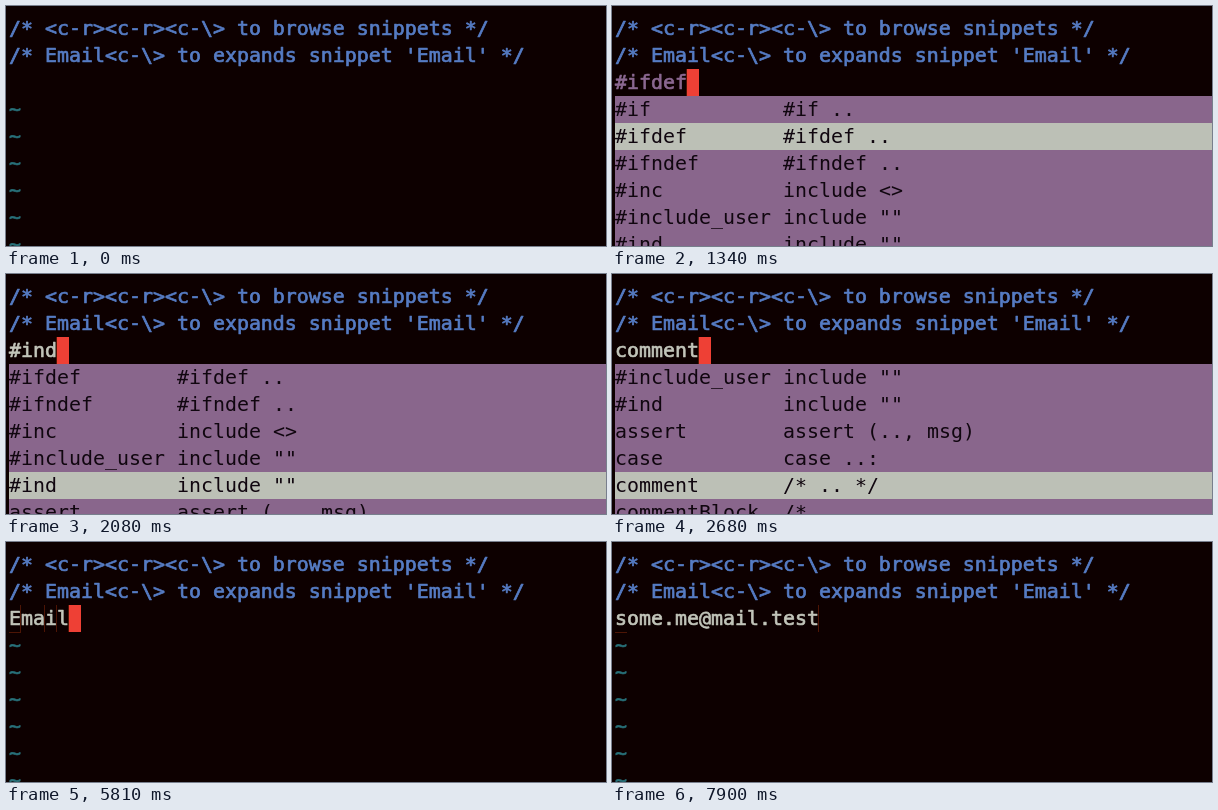
Recreate the animation shown at these times as an HTML page with a canvas. Size 600 by 240 pixels, loop 8000 ms.

```html
<!DOCTYPE html>
<html lang="en">
<head>
<meta charset="utf-8">
<title>Snippet completion</title>
<style>
  html, body { margin: 0; width: 600px; height: 240px; overflow: hidden; background: #0d0000; }
  canvas { display: block; }
</style>
</head>
<body>
<canvas id="stage" width="600" height="240"></canvas>
<script>
const ctx = document.getElementById('stage').getContext('2d');
const LOOP = 8000, LEFT = 3, TOP = 9, CELL = 12, ROW = 27, BASELINE = 20;
const INPUT_ROW = 2, MENU_ROW = 3, VISIBLE = 6, FULL_ROWS = 5, DETAIL_COL = 14;
const FONT = '19.93px "DejaVu Sans Mono", "Noto Sans Mono", monospace';
const COLOR = {
  back: '#0d0000', comment: '#567cc4', plain: '#c2c5ba', tilde: '#28717a',
  directive: '#8b6891', keyword: '#c0a11f', menu: '#89668c', selected: '#bcc0b6',
  ink: '#10060f', cursor: '#ee4035', fringe: '#4d1505'
};

const header = [
  "/* <c-r><c-r><c-\\> to browse snippets */",
  "/* Email<c-\\> to expands snippet 'Email' */"
];
const items = [
  ['#if', '#if ..'], ['#ifdef', '#ifdef ..'], ['#ifndef', '#ifndef ..'],
  ['#inc', 'include <>'], ['#include_user', 'include ""'], ['#ind', 'include ""'],
  ['assert', 'assert (.., msg)'], ['case', 'case ..:'],
  ['comment', '/* .. */'], ['commentBlock', '/*']
];

const MENU_OPEN = 150, MENU_CLOSE = 4020, CURSOR_OFF = 6250, EXPAND = 6850, EXPANDED_OFF = 7900;
const selectTimes = [900, 1340, 1490, 1640, 1790, 2080, 2380, 2530, 2680];
const typing = [[4020, 0], [5210, 1], [5510, 3], [5660, 4], [5810, 5]];
const word = 'Email';
const expansion = 'some.me@mail.test';

const colX = col => LEFT + col * CELL;
const rowY = row => TOP + row * ROW;

function box(color, x, y, w, h) {
  ctx.fillStyle = color;
  ctx.fillRect(x, y, w, h);
}

function text(str, col, row, color) {
  ctx.font = FONT;
  ctx.fillStyle = color;
  ctx.fillText(str, colX(col), rowY(row) + BASELINE);
}

// The terminal thickens its regular face instead of using a bold one.
function boldText(str, col, row, color) {
  text(str, col, row, color);
  ctx.strokeStyle = color;
  ctx.lineWidth = 0.7;
  ctx.lineJoin = 'round';
  ctx.strokeText(str, colX(col), rowY(row) + BASELINE);
}

function fringe(col) {
  box(COLOR.fringe, colX(col) - 1, rowY(INPUT_ROW), 1, ROW);
}

function cursor(col) {
  box(COLOR.cursor, colX(col), rowY(INPUT_ROW), CELL, ROW);
}

function input(str, color = COLOR.plain) {
  boldText(str, 0, INPUT_ROW, color);
}

function wordColor(str) {
  if (/^#ifn?(def)?$/.test(str)) return COLOR.directive;
  return str === 'case' ? COLOR.keyword : COLOR.plain;
}

function drawMenu(t) {
  const chosen = selectTimes.filter(time => time <= t).length - 1;
  const first = Math.max(0, chosen - FULL_ROWS + 1);
  box(COLOR.menu, LEFT, rowY(MENU_ROW), 600, 240);
  for (let i = 0; i < VISIBLE; i++) {
    const [name, detail] = items[first + i];
    const row = MENU_ROW + i;
    if (first + i === chosen) box(COLOR.selected, LEFT, rowY(row), 600, ROW);
    text(name, 0, row, COLOR.ink);
    text(detail, DETAIL_COL, row, COLOR.ink);
  }
  if (chosen >= 0) {
    const name = items[chosen][0];
    input(name, wordColor(name));
    fringe(name.length);
    cursor(name.length);
  }
}

function drawTyping(t) {
  box(COLOR.fringe, LEFT, rowY(MENU_ROW), CELL, 1);
  if (t >= EXPAND) {
    input(expansion);
    fringe(expansion.length);
    if (t < EXPANDED_OFF) cursor(expansion.length);
    return;
  }
  const stops = typing.filter(([time]) => time <= t).map(([, count]) => count);
  const count = stops[stops.length - 1];
  input(word.slice(0, count));
  stops.filter(col => col > 0).forEach(fringe);
  if (t < CURSOR_OFF) cursor(count);
}

function draw(t) {
  box(COLOR.back, 0, 0, 600, 240);
  header.forEach((line, row) => boldText(line, 0, row, COLOR.comment));
  if (t >= MENU_OPEN && t < MENU_CLOSE) {
    drawMenu(t);
    return;
  }
  for (let i = 0; i < VISIBLE; i++) boldText('~', 0, MENU_ROW + i, COLOR.tilde);
  if (t >= MENU_CLOSE) drawTyping(t);
}

function tick() {
  draw(performance.now() % LOOP);
  requestAnimationFrame(tick);
}
tick();
</script>
</body>
</html>
```
